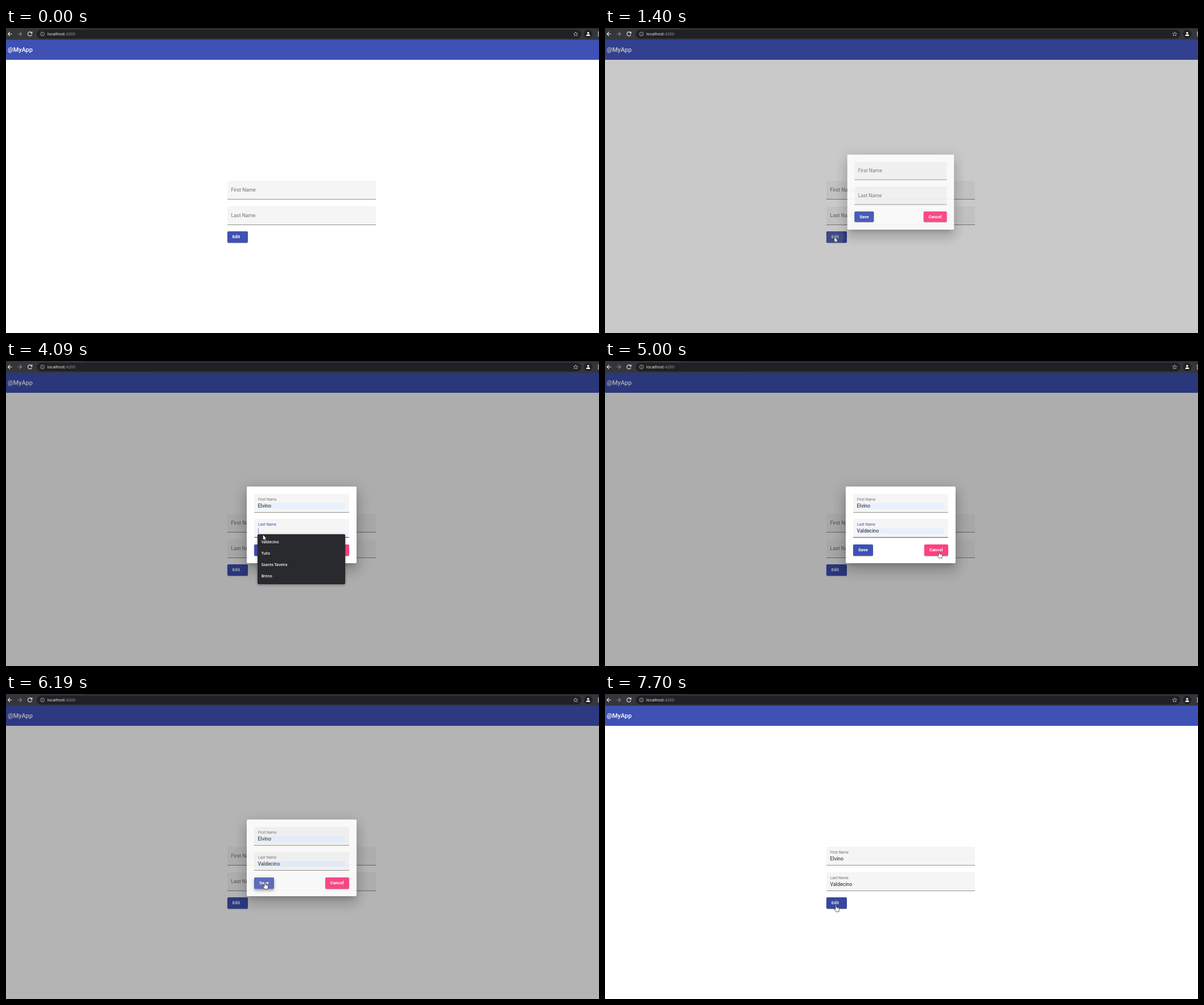
Animation, 1042 px wide and 537 px high, one loop 8 s. Source, as an HTML page:

```html
<!DOCTYPE html>
<html lang="en">
<head>
<meta charset="utf-8">
<title>Edit dialog</title>
<style>
  html, body { margin: 0; width: 100%; height: 100%; overflow: hidden; background: #fff; }
  body { position: relative; font: 8.85px/12px Roboto, sans-serif; }
  div, svg { position: absolute; left: 0; top: 0; box-sizing: border-box; white-space: pre; }
  #stage { width: 1042px; height: 537px; overflow: hidden; background: #fff; }
  #header { top: 20px; width: 1042px; height: 36px; background: #3f51b5; color: #fff;
    font-size: 10.9px; font-weight: 500; line-height: 38px; padding-left: 3px; }
  #backdrop { top: 20px; width: 1042px; height: 517px; background: #000; }
  #dialog { left: 423px; top: 220.5px; width: 192.5px; height: 135.5px; background: #fff; border-radius: 2px;
    box-shadow: 0 6px 8px -4px rgba(0,0,0,.2), 0 13px 21px 2px rgba(0,0,0,.14), 0 5px 25px 4px rgba(0,0,0,.12); }
  .field { height: 33px; background: #f5f5f5; border-radius: 2px 2px 0 0; }
  .base, .line { left: 0; width: 100%; }
  .base { top: 32px; height: 1px; background: rgba(0,0,0,.42); }
  .line { top: 31.6px; height: 1.4px; }
  .label { left: 6.5px; top: 10.2px; transform-origin: 0 50%; }
  .value { left: 6.5px; right: 6.5px; top: 16px; height: 10px; line-height: 10px; color: rgba(0,0,0,.87); }
  .caret { left: 7px; top: 16px; width: 1px; height: 10px; background: #7d88cc; }
  .button { height: 19.7px; border-radius: 2px; color: #fff; font-size: 7.75px; font-weight: 600;
    line-height: 19px; text-align: center;
    box-shadow: 0 1.6px .5px -1px rgba(0,0,0,.2), 0 1px 1px rgba(0,0,0,.14), 0 .5px 2.7px rgba(0,0,0,.12); }
  .button.pressed { box-shadow: 0 3px 3px -1px rgba(0,0,0,.2), 0 4px 5px rgba(0,0,0,.14), 0 2px 8px rgba(0,0,0,.12); }
  .wash { inset: 0; border-radius: 2px; overflow: hidden; }
  .list { left: 442px; width: 154px; padding: 4.2px 0; background: #292a2d; border-radius: 2px; color: #fff;
    font: 600 6.6px/19.8px "Open Sans", sans-serif; box-shadow: 0 1px 4px rgba(0,0,0,.4); }
  .list div { position: static; height: 19.8px; padding-left: 6.7px; }
  #bar { font: 7.3px "Open Sans", sans-serif; }
</style>
</head>
<body>
<div id="stage">
  <div id="header">@MyApp</div>
  <div id="page"></div>
  <div id="backdrop"></div>
  <div id="dialog"></div>
  <div id="lists"></div>
  <svg id="bar" width="1042" height="21" fill="none" stroke="#e8eaed" stroke-width="1.1">
    <g stroke="none">
      <rect width="1042" height="20.6" fill="#35363a"/>
      <rect x="135" width="907" height="1" fill="#202124"/>
      <rect x="54" y="3" width="957" height="15.5" rx="7.75" fill="#202124"/>
      <text x="72.7" y="13.3" fill="#fff">localhost<tspan fill="#9aa0a6">:4200</tspan></text>
      <circle cx="1023" cy="10.5" r="7.5" fill="#202124"/>
    </g>
    <path d="M10.5 10.5H3.5M7 7l-3.5 3.5L7 14"/>
    <path d="M20.5 10.5H27.5M24 7l3.5 3.5L24 14" stroke="#85868a"/>
    <path d="M45 8.4A3.6 3.6 0 1 0 45.5 11.4M45.8 6.5V9.2H43"/>
    <g stroke="#bdc1c6" stroke-width=".8">
      <circle cx="64" cy="10.5" r="3.4"/>
      <path d="M64 10v2.3M64 8.5v.8"/>
      <path d="M1001 6.8l1.1 2.5 2.7.2-2.1 1.8.7 2.7-2.4-1.5-2.4 1.5.7-2.7-2.1-1.8 2.7-.2z"/>
    </g>
    <g fill="#fff" stroke="none">
      <circle cx="1023" cy="8.8" r="1.8"/>
      <path d="M1019.6 14v-.7c0-2.6 6.8-2.6 6.8 0v.7z"/>
      <circle cx="1041" cy="7.4" r=".9"/><circle cx="1041" cy="10.5" r=".9"/><circle cx="1041" cy="13.6" r=".9"/>
    </g>
  </svg>
  <svg id="cursor" width="1" height="1" overflow="visible" stroke-linejoin="round">
    <path id="arrow" d="M0 0V9.2L2.1 7.3 3.6 10.6 5.1 9.9 3.7 6.8H6.5z" fill="#fff" stroke="#222" stroke-width=".6"/>
    <g id="hand" fill="#fff" stroke="#222" stroke-width=".7">
      <path d="M-1 .8C-1-.3 .6-.3 .6 .8V4.4L4.6 5.2Q5.9 5.6 5.8 7L5 12.4H-.2L-3.4 8.2C-3.9 7.2-2.7 6.6-2 7.4L-1 8.3z"/>
      <path d="M2 5v2M3.7 5.3v1.9" stroke-width=".5"/>
    </g>
    <path id="beam" d="M-2.3-4.5H-.6L0-4 .6-4.5H2.3M0-4V4M-2.3 4.5H-.6L0 4 .6 4.5H2.3" fill="none" stroke="#333" stroke-width=".8"/>
  </svg>
</div>
<script>
const LOOP = 8000;
const BLUE = '#3f51b5', PINK = '#ff4081';
const FIRST = 'Elvino', LAST = 'Valdecino';
const $ = id => document.getElementById(id);
const clamp = v => Math.max(0, Math.min(1, v));
const within = (t, from, to) => t >= from && t < to;

function bezier(x1, y1, x2, y2) {
  const at = (s, a, b) => 3 * s * (1 - s) ** 2 * a + 3 * s * s * (1 - s) * b + s ** 3;
  return x => {
    if (x <= 0 || x >= 1) return clamp(x);
    let lo = 0, hi = 1;
    for (let i = 0; i < 20; i++) {
      const mid = (lo + hi) / 2;
      if (at(mid, x1, x2) < x) lo = mid; else hi = mid;
    }
    return at(lo, y1, y2);
  };
}
const swift = bezier(.25, .8, .25, 1);
const decelerate = bezier(0, 0, .2, 1);
const inOut = bezier(.4, 0, .3, 1);
const ramp = (t, start, length, ease = swift) => ease((t - start) / length);

function add(parent, className, style = {}, text = '') {
  const node = document.createElement('div');
  node.className = className;
  node.textContent = text;
  for (const key in style) node.style[key] = typeof style[key] === 'number' ? style[key] + 'px' : style[key];
  return parent.appendChild(node);
}

function field(parent, left, top, width, name) {
  const box = add(parent, 'field', { left, top, width });
  const value = add(box, 'value');
  const label = add(box, 'label', {}, name);
  const caret = add(box, 'caret');
  add(box, 'base');
  const line = add(box, 'line');
  return ({ float = 0, focus = 0, hover = 0, text = '', filled = false, caretOn = false }) => {
    label.style.transform = `translateY(${-6.4 * float}px) scale(${1 - .25 * float})`;
    label.style.color = focus ? BLUE : 'rgba(0,0,0,.54)';
    value.textContent = text;
    value.style.background = filled ? '#e8f0fe' : 'none';
    caret.style.opacity = +caretOn;
    line.style.background = focus ? BLUE : 'rgba(0,0,0,.87)';
    line.style.opacity = focus ? 1 : hover;
    line.style.transform = `scaleX(${focus || 1})`;
  };
}

function button(parent, left, top, width, text, color, shift = 0) {
  const node = add(parent, 'button', { left, top, width, background: color, paddingRight: shift }, text);
  const wash = add(node, 'wash');
  return ({ focused = 0, radius = 0, strength = 0, pressed = false }) => {
    const light = `rgba(255,255,255,${.12 * strength})`;
    const dark = `rgba(0,0,0,${.12 * focused})`;
    wash.style.background =
      `radial-gradient(circle at 15px 10px, ${light} ${radius}px, transparent ${radius + 1}px), ${dark}`;
    node.classList.toggle('pressed', pressed);
  };
}

function list(top, names) {
  const node = add($('lists'), 'list', { top });
  const rows = names.map(name => add(node, '', {}, name));
  return (open, hovered) => {
    node.style.display = open ? 'block' : 'none';
    rows[0].style.background = hovered ? '#3f4043' : 'none';
  };
}

const page = $('page'), dialog = $('dialog');
const pageFirst = field(page, 389, 269, 260.5, 'First Name');
const pageLast = field(page, 389, 313.8, 260.5, 'Last Name');
const edit = button(page, 389, 358.4, 35.5, 'Edit', BLUE, 4.5);
const first = field(dialog, 13, 13, 166.5, 'First Name');
const last = field(dialog, 13, 57.8, 166.5, 'Last Name');
const save = button(dialog, 13, 102.5, 35, 'Save', BLUE);
const cancel = button(dialog, 138, 102.5, 41.5, 'Cancel', PINK);
const firstList = list(260.5, [FIRST, 'Breno', 'Rosilda', 'R', 'Elvnio']);
const lastList = list(305, [LAST, 'Tulio', 'Soares Taveira', 'Breno']);

// Time, x, y of the pointer
const path = [
  [400, 940, 530], [1050, 403, 368], [1650, 403, 368], [2120, 452.5, 257], [2440, 452.5, 257],
  [2700, 452, 272], [3060, 452, 272], [3350, 452, 299], [3900, 452, 299], [4090, 451.5, 306],
  [4260, 453, 318], [4550, 455, 318], [4900, 590, 334], [5340, 572, 338], [5950, 455, 331],
  [6960, 455, 331], [7300, 406, 374], [7580, 406, 374], [7700, 406, 371]
];
const shapes = [
  [400, 'arrow'], [1000, 'hand'], [1310, 'arrow'], [2000, 'beam'], [2560, 'arrow'], [3160, 'beam'],
  [4000, 'arrow'], [4820, 'hand'], [5440, 'arrow'], [5880, 'hand'], [6200, 'beam'], [7080, 'arrow'], [7200, 'hand']
];

function drawCursor(t) {
  const next = path.findIndex(p => p[0] > t);
  const b = path.at(next), a = next > 0 ? path[next - 1] : b;
  const k = a === b ? 1 : inOut((t - a[0]) / (b[0] - a[0]));
  const [x, y] = [1, 2].map(i => a[i] + (b[i] - a[i]) * k);
  const shape = shapes.findLast(s => s[0] <= t)?.[1];
  $('cursor').style.transform = `translate(${x}px, ${y}px)`;
  for (const id of ['arrow', 'hand', 'beam']) $(id).style.display = id === shape ? '' : 'none';
}

const OPEN = 1310, CLOSE = 6185, FOCUS_FIRST = 2140, FOCUS_LAST = 3680, SAVE = 6030;

function draw(t) {
  const leave = ramp(t, CLOSE, 75, clamp);
  const enter = ramp(t, OPEN, 150, decelerate);
  $('backdrop').style.opacity = .32 * ramp(t, OPEN, 400) * (1 - leave);
  dialog.style.opacity = enter * (1 - leave);
  dialog.style.transform = `scale(${.7 + .3 * enter})`;

  const filled = ramp(t, 6270, 230);
  pageFirst({ float: filled, text: t > 6270 ? FIRST : '' });
  pageLast({ float: filled, text: t > 6270 ? LAST : '', hover: +within(t, 6780, 7030) });
  edit({
    focused: within(t, 1250, 1470) || t >= 6320 ? 1 : 0,
    radius: 40 * clamp((t - 1300) / 260),
    strength: t < 1300 ? 0 : 1 - clamp((t - 1500) / 300),
    pressed: within(t, 1190, 1310)
  });

  const firstText = t >= 2680 ? FIRST : '', lastText = t >= 4200 ? LAST : '';
  const saved = t >= SAVE;
  first({
    float: ramp(t, FOCUS_FIRST, 300),
    focus: t < FOCUS_LAST ? ramp(t, FOCUS_FIRST, 300) : 0,
    text: firstText, filled: !!firstText,
    caretOn: within(t, FOCUS_FIRST, 2670)
  });
  last({
    float: ramp(t, FOCUS_LAST, 300),
    focus: saved ? 0 : ramp(t, FOCUS_LAST, 300),
    hover: saved ? 0 : ramp(t, 3200, 160),
    text: lastText, filled: !!lastText,
    caretOn: within(t, FOCUS_LAST, 4200)
  });
  save({ radius: 45 * clamp((t - SAVE) / 90), strength: +saved, pressed: saved });
  cancel({});

  firstList(within(t, 2250, 2960), t >= 2680);
  lastList(within(t, 3750, 4430), t >= 4200);
  drawCursor(t);
}

function frame() {
  draw(performance.now() % LOOP);
  requestAnimationFrame(frame);
}
frame();
</script>
</body>
</html>
```
